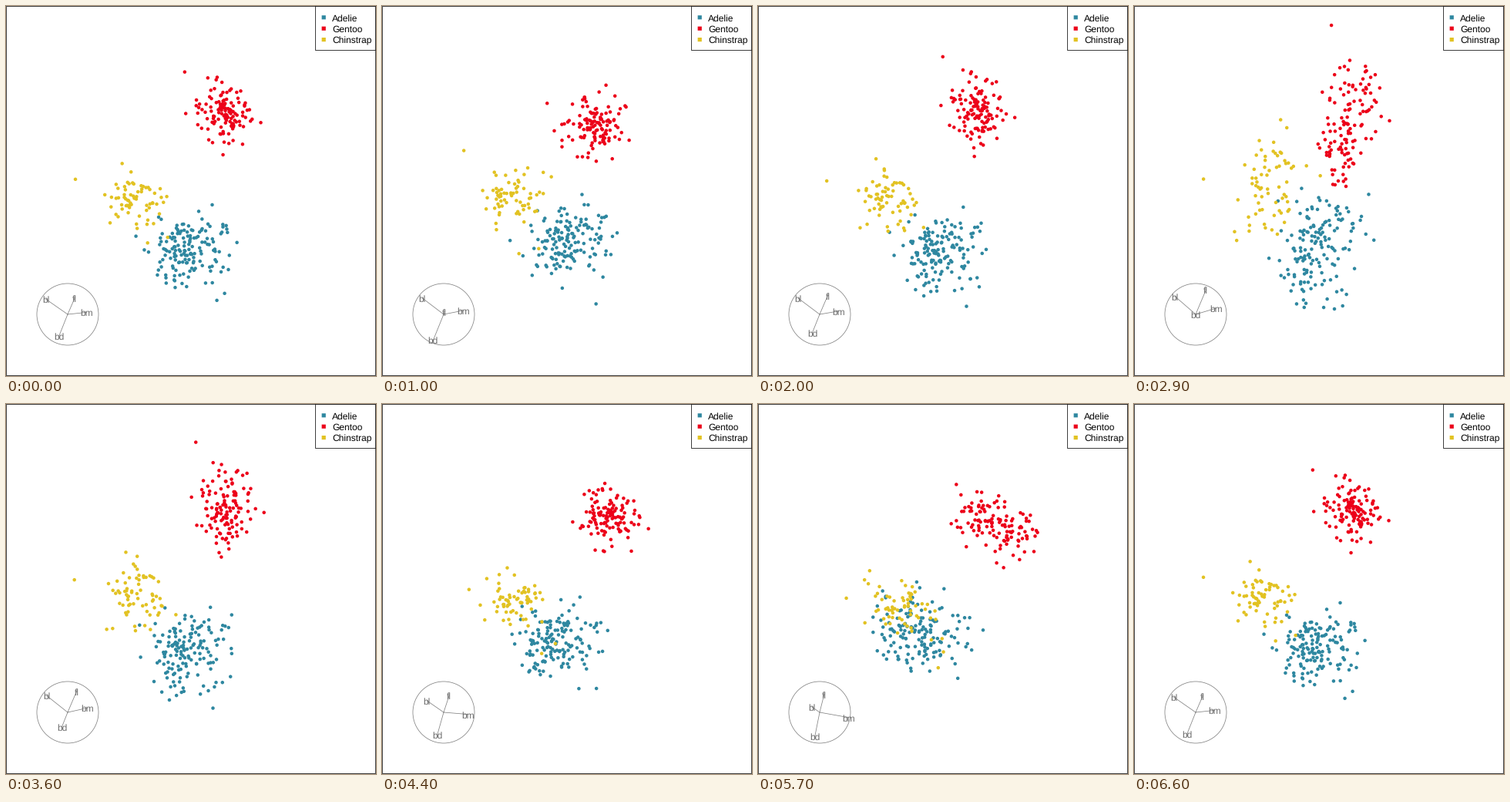
These frames come from a looping animation (480x480 px, 6.7 s). A matplotlib script:

```python
import numpy as np
import matplotlib.pyplot as plt
from matplotlib.animation import FuncAnimation
from matplotlib.patches import Circle, Rectangle

SIZE, DPI, FRAMES, INTERVAL = 480, 100, 67, 100
PX = 72 / DPI
LINE = .75 * PX
SCALE = 57.2
HUB, RADIUS = np.array([80, 400]), 40
GREY, INK = "#7f7f7f", "#6e6e6e"
plt.rcParams.update({"font.family": "Liberation Sans", "text.hinting": "none"})

VARS = ["bl", "bd", "fl", "bm"]
SPREAD = np.array([.55, .57, .48, .56])

# Group: colour, count, mean, shared correlation, one far-out member
GROUPS = {
    "Adelie": ("#2e87a0", 151, (-.94, .61, -.78, -.62), .44, (-1.71, 2, -.21, .25)),
    "Gentoo": ("#ec0019", 123, (.66, -1.1, 1.16, 1.09), .68, (2.87, -.08, 2.07, 2.3)),
    "Chinstrap": ("#e2c222", 68, (.9, .64, -.36, -.59), .56, (2.58, .33, -1.41, -.63)),
}

# Home projection, and the variables rotated out of it with the steps each way
home = np.array([[-.706, .491], [-.279, -.694], [.228, .524], [.608, .066]])
u, _, vt = np.linalg.svd(home, full_matrices=False)
HOME = u @ vt
LEGS = [(2, 9), (1, 11), (0, 13)]


def cloud(rng, count, mean, corr, far):
    """Points sharing a two-peaked body size, each variable with its own noise."""
    z = rng.normal(size=(count - 1, 5)).clip(-2.4, 2.4)
    z[:, 0] = .45 * z[:, 0] + .9 * (-1) ** np.arange(count - 1)
    z = (z - z.mean(0)) / z.std(0)
    shape = np.sqrt(corr) * z[:, :1] + np.sqrt(1 - corr) * z[:, 1:]
    return np.vstack([mean + SPREAD * shape, far])


def projection(i):
    for var, steps in LEGS:
        if i <= 2 * steps:
            break
        i -= 2 * steps
    row = HOME[var]
    r = np.hypot(*row)
    way = row / r
    axis = HOME @ way
    unit = np.eye(4)[var]
    rest = (axis - r * unit) / np.sqrt(1 - r * r)
    angle = np.arcsin(r) * abs(i - steps) / steps
    turned = np.sin(angle) * unit + np.cos(angle) * rest
    return HOME + np.outer(turned - axis, way)


rng = np.random.default_rng(7)
data = np.vstack([cloud(rng, *g[1:]) for g in GROUPS.values()])
colors = np.repeat([g[0] for g in GROUPS.values()], [g[1] for g in GROUPS.values()])

fig = plt.figure(figsize=(SIZE / DPI, SIZE / DPI), dpi=DPI, facecolor="white")
ax = fig.add_axes([0, 0, 1, 1])
ax.set(xlim=(0, SIZE), ylim=(SIZE, 0))
ax.axis("off")


def box(x, y, w, h, **style):
    ax.add_patch(Rectangle((x, y), w, h, snap=False, **style))


def label(x, y, text, color, ha):
    return ax.text(x, y, text, color=color, ha=ha, va="baseline", fontsize=12 * PX, zorder=5)


box(.5, .5, 479, 479, fill=False, ec="black", lw=LINE)
box(401.5, .5, 78, 57, fc="white", ec="black", lw=LINE, zorder=4)
for k, (name, group) in enumerate(GROUPS.items()):
    y = 14.8 + 14.4 * k
    box(409.6, y - 2.6, 5.2, 5.2, fc=group[0], lw=0, zorder=5)
    label(423, y + 4.9, name, "black", "left")

ax.add_patch(Circle(HUB, RADIUS, fill=False, ec=GREY, lw=LINE))
spokes = [ax.plot([], [], color=GREY, lw=LINE)[0] for _ in VARS]
names = [label(*HUB, v, INK, "center") for v in VARS]
dots = ax.scatter(*np.zeros((2, len(data))), s=(4.5 * PX) ** 2, c=colors, lw=0, zorder=3)


def draw(i):
    basis = projection(i) * [1, -1]
    dots.set_offsets(SIZE / 2 + SCALE * data @ basis)
    for spoke, name, tip in zip(spokes, names, HUB + RADIUS * basis):
        spoke.set_data(*zip(HUB, tip))
        name.set_position(tip + [0, 4.8])
    return [dots, *spokes, *names]


anim = FuncAnimation(fig, draw, frames=FRAMES, interval=INTERVAL, repeat=True, repeat_delay=0)
plt.show()
```
